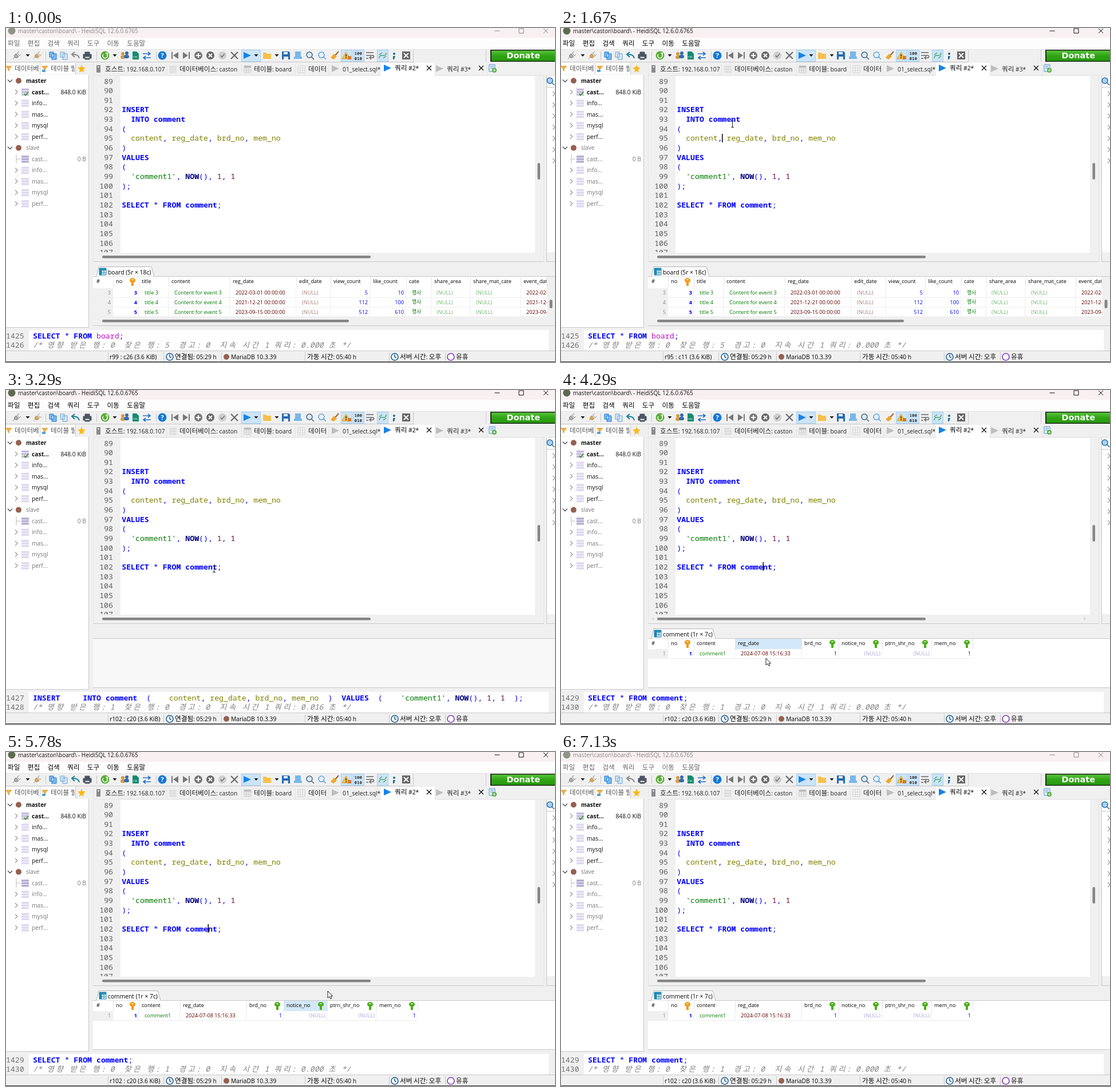
An HTML page with a canvas for the animation above (7220 ms loop, 959 by 584 pixels).

```html
<!DOCTYPE html>
<html lang="ko">
<head>
<meta charset="utf-8">
<style>
html, body { margin: 0; width: 959px; height: 584px; overflow: hidden; background: #f0f0f0; }
canvas { display: block; }
</style>
</head>
<body>
<canvas id="stage" width="959" height="584"></canvas>
<script>
const ctx = document.getElementById('stage').getContext('2d');
const LOOP = 7220, CELL = 7.93;
const UI = '"Open Sans", "Noto Sans", "Noto Sans CJK KR", sans-serif';
const MONO = '"Noto Sans Mono", "Noto Sans CJK KR", monospace';
const FACE = '#f0f0f0', LINE = '#c8c8c8', PALE = '#e4e4e4', BLUE = '#0000ff', SKY = '#1479d7';
const THUMB = '#858585', GREEN = '#007a00', MAROON = '#600000', BROWN = '#95604f';

const rect = (x, y, w, h, c) => { ctx.fillStyle = c; ctx.fillRect(x, y, w, h); };

function pill(x, y, w, h, c) {
  ctx.fillStyle = c;
  ctx.beginPath();
  ctx.roundRect(x, y, w, h, Math.min(w, h) / 2);
  ctx.fill();
}

function disc(x, y, r, c) {
  ctx.fillStyle = c;
  ctx.beginPath();
  ctx.arc(x, y, r, 0, 7);
  ctx.fill();
}

// SVG path centred on x, y
function icon(x, y, d, fill, stroke, width = 1.3) {
  ctx.save();
  ctx.translate(x, y);
  const p = new Path2D(d);
  if (fill) { ctx.fillStyle = fill; ctx.fill(p, 'evenodd'); }
  if (stroke) { ctx.strokeStyle = stroke; ctx.lineWidth = width; ctx.stroke(p); }
  ctx.restore();
}

function clip(x, y, w, h, draw) {
  ctx.save();
  ctx.beginPath();
  ctx.rect(x, y, w, h);
  ctx.clip();
  draw();
  ctx.restore();
}

// Hangul runs are set slightly larger than Latin ones; y is the cap-height centre
function text(s, x, y, color = '#000', { size = 10.3, bold = '', right = false, font = UI } = {}) {
  const runs = s.split(/([가-힣]+)/).filter(Boolean).map(r => {
    const f = `${bold} ${/[가-힣]/.test(r) ? size * 1.13 : size}px ${font}`;
    ctx.font = f;
    return [r, f, ctx.measureText(r).width];
  });
  if (right) x -= runs.reduce((sum, r) => sum + r[2], 0);
  ctx.fillStyle = color;
  for (const [r, f, w] of runs) {
    ctx.font = f;
    ctx.fillText(r, x, y + size * 0.36);
    x += w;
  }
}

function mono(s, x, y, color, style = '500') {
  ctx.font = `${style} 13.2px ${MONO}`;
  ctx.fillStyle = color;
  ctx.fillText(s, x, y + 4.7);
}

const TOKENS = [
  [/^'/, GREEN], [/^NOW$/, '#000080', 'bold'], [/^\d/, '#700040'], [/^board$/, '#c010c0'],
  [/^(INSERT|INTO|comment|VALUES|SELECT|FROM)$/, BLUE, 'bold'], [/^\w/, '#808000'], [/./, BLUE],
];
function sql(s, x, y) {
  for (const m of s.matchAll(/'\w+'|\w+|[^\w\s']/g)) {
    const [, color, style] = TOKENS.find(k => k[0].test(m[0]));
    mono(m[0], x + m.index * CELL, y, color, style);
  }
}

function logNote(s, y) {
  let x = 47;
  for (const ch of s) {
    const wide = /[가-힣]/.test(ch);
    mono(ch, x + (wide ? 1 : 0), y, '#808080', 'italic');
    x += CELL * (wide ? 2 : 1);
  }
}

const CHEVRON = 'M-2 -4L2 0L-2 4', DOWN = 'M-4 -2L0 2L4 -2', CROSS = 'M-4 -4L4 4M4 -4L-4 4';
const PLAY = 'M-6 -6L7 0L-6 6Z', DROP = 'M-3.5 -2H3.5L0 2Z', FUNNEL = 'M-6 -5H6L1 1V5L-2 3V1Z';
const LENS = 'M-6 -1A5 5 0 1 0 4 -1A5 5 0 1 0 -6 -1M3 3L7 7', BOX = 'M-6 -6H6V6H-6Z';
const GRID = BOX + 'M-6 -2H6M-6 2H6M-2 -6V6M2 -6V6';
const KEY = 'M-5 -3A5 4 0 1 1 5 -3A5 4 0 0 1 2 1V7H-2V1A5 4 0 0 1 -5 -3M-1.5 -4.5H1.5V-3H-1.5Z';
const PLUG = 'M-7 6L-4 3Q-6 -1 -1 -3L3 2Q0 6 -4 3M0 -4L4 -7M4 1L7 -2M1 -4L5 1';
const PAGES = 'M-6 -6H1V3H-6ZM-2 -3H6V7H-2Z';

const dbIcon = (x, y, c) => { for (const dy of [-6, -1.5, 3]) rect(x - 6, y + dy, 13, 3.5, c); };
const clock = (x, y) => icon(x, y, 'M-6 0A6 6 0 1 0 6 0A6 6 0 1 0 -6 0M0 -4V0L3 2', '#fff', '#155a92', 1.5);

function titleAndMenu(active) {
  const ink = active ? '#111' : '#888';
  rect(0, 0, 959, 17, '#f9f0f2');
  disc(10, 5, 6.5, active ? '#5d6b4d' : '#8d9584');
  text('master\\caston\\board\\ - HeidiSQL 12.6.0.6765', 21, 5.5, ink, { size: 10 });
  icon(858, 5, 'M-4.5 0H4.5', null, ink, 1);
  icon(900, 5, 'M-4 -4H4V4H-4Z', null, ink, 1);
  icon(943, 5, CROSS, null, ink, 1);
  rect(0, 17, 959, 20, '#fdfdfd');
  ['파일', '편집', '검색', '쿼리', '도구', '이동', '도움말']
    .forEach((s, i) => text(s, 3 + i * 34.7, 27, active ? '#000' : '#666'));
}

function toolbar(active) {
  const y = 48, dark = '#666';
  rect(0, 37, 959, 23, FACE);
  rect(0, 37, 959, 1, PALE);
  rect(0, 59, 711, 1, LINE);
  rect(711, 38, 1, 22, LINE);
  [69, 158, 262].forEach(x => rect(x, 41, 1, 15, LINE));
  [[411, 34], [585, 20], [606, 20], [648, 20]].forEach(([x, w]) => {
    rect(x, 38, w, 21, '#a6cff0');
    rect(x + 1, 39, w - 2, 19, '#cce4f7');
  });
  icon(19, y, PLUG, '#aaa', '#888', 1);
  icon(55, y, PLUG, '#e6a23c', '#999', 1);
  [38, 190, 437, 473].forEach(x => icon(x, y, DROP, '#111'));
  icon(82, y, PAGES, '#7dbcf0', SKY, 1);
  icon(101, y, PAGES, '#d5e9f8', '#6aa0cf', 1);
  icon(121, y, 'M7 5Q6 -2 -4 -2M-1 -6L-6 -2L-1 3', null, active ? '#138094' : '#888', 2);
  icon(142, y, 'M-7 -2H7V5H-7ZM-4 -6H4V-2H-4ZM-4 2H4V7H-4Z', '#4b5562', '#4b5562', 1);
  disc(173, y, 7.5, '#58ad35');
  icon(173, y, 'M3 -2A4 4 0 1 1 -3 -2M1 -4H4V0', null, '#fff', 1.6);
  disc(204, 45, 3, '#d99a3b'); disc(211, 44, 3, '#2f6db5');
  pill(200, 48, 8, 6, '#d99a3b'); pill(206, 47, 9, 6, '#2f6db5');
  icon(226, y, 'M-5 -7H2L6 -3V7H-5Z', '#168a72');
  text('csv', 222, 50, '#fff', { size: 5 });
  icon(246, y, 'M-7 -3H5M2 -6L6 -3L2 0M7 4H-5M-2 1L-6 4L-2 7', null, '#2672c8', 1.6);
  disc(273, y, 7.5, SKY);
  text('?', 270.5, y, '#fff', { size: 11, bold: 'bold' });
  icon(295, y, 'M-6 -6H-4V6H-6ZM6 -6V6L-3 0Z', '#777');
  icon(315, y, 'M6 -6H4V6H6ZM-6 -6V6L3 0Z', '#777');
  disc(336, y, 7, '#777'); icon(336, y, 'M-4 0H4M0 -4V4', null, '#fff', 2);
  disc(357, y, 7, dark); icon(357, y, 'M-3 -3L3 3M3 -3L-3 3', null, '#fff', 2);
  disc(378, y, 7, '#cfcfcf'); icon(378, y, 'M-3 0L-1 3L4 -3', null, '#777', 1.6);
  icon(399, y, 'M-6 -6L6 6M6 -6L-6 6', null, dark, 2);
  icon(421, y, PLAY, '#1683e6');
  icon(456, y, 'M-7 -5H-2L0 -3H7V6H-7Z', '#f6c04a');
  icon(489, y, 'M-7 -7H5L7 -5V7H-7ZM-4 -6V-2H3V-6ZM-4 2V7H4V2Z', '#216bb5');
  icon(510, y, 'M-5 -7H5V2H7V6H-7V2H-5Z', '#78b7ea');
  icon(531, y, LENS, '#d8ecfa', '#44617c', 1.5);
  ctx.setLineDash([2, 1]); icon(552, y, LENS, '#e5f2fb', SKY, 1.4); ctx.setLineDash([]);
  icon(574, y, 'M7 -7L1 0', null, '#9a6230', 2);
  icon(574, y, 'M-1 -3L4 2L-2 7L-7 4Z', '#f0a62b');
  icon(594, y, 'M0 -6L7 6H-7Z', '#f7c14a', '#d99a2b', 1);
  icon(594, y, 'M0 -2V2M0 3V5', null, '#222', 1.5);
  icon(600, 52, 'M-3 -3H3V3H-3Z', '#d8792b');
  text('100', 608.5, 44.5, '#333', { size: 7.5, bold: 'bold', font: MONO });
  text('010', 608.5, 53, '#333', { size: 7.5, bold: 'bold', font: MONO });
  icon(636, y, 'M-7 -5H6M-7 0H4Q8 0 6 4H0M2 1L-1 4L2 7M-7 5H-3', null, dark, 1.4);
  icon(658, y, 'M-6 5Q-6 -1 0 0T6 -5M-6 -1L-1 -5M1 5L6 1', null, '#4fa46a', 1.5);
  disc(678, 45, 2, '#176f91'); icon(678, 51, 'M-2 -2H2L0 4H-2Z', '#176f91');
  icon(699, y, 'M-7 -7H7V7H-7Z', '#666'); icon(699, y, CROSS, null, '#fff', 1.8);

  rect(838, 38, 1, 21, LINE);
  rect(846, 38, 113, 21, '#1c2a18');
  const g = ctx.createLinearGradient(0, 39, 0, 58);
  g.addColorStop(0, '#5cc43e'); g.addColorStop(.5, '#2ea414'); g.addColorStop(1, '#27990f');
  rect(848, 39.5, 111, 18, g);
  text('Donate', 874.5, 48, '#fff', { size: 14.4, bold: 'bold', font: '"DejaVu Sans", sans-serif' });
}

function tabs() {
  rect(0, 60, 959, 24, FACE);
  rect(0, 61, 121, 20, '#fff');
  icon(5, 71, FUNNEL, '#e9b04c');
  clip(0, 60, 57, 24, () => text('데이터베이스', 15, 71, '#555'));
  icon(68, 71, FUNNEL, '#e9b04c'); rect(63, 73, 6, 4, '#52a1df');
  clip(60, 60, 60, 24, () => text('테이블 필터', 78, 71, '#555'));
  rect(59, 61, 1, 20, LINE); rect(121, 61, 1, 20, LINE);
  icon(132, 71, 'M0 -7L2 -2L7 -2L3 2L4 7L0 4L-4 7L-3 2L-7 -2L-2 -2Z', '#fbb713');

  rect(152, 82, 807, 1, PALE);
  [152, 280, 411, 505, 563, 749, 840].forEach(x => rect(x, 63, 1, 19, PALE));
  rect(655, 61, 94, 23, '#fff');
  rect(158, 65, 7, 13, '#8b8b8b'); rect(160, 67, 3, 2, '#ddd');
  dbIcon(291, 72, '#dedede');
  icon(422, 72, GRID, '#eee', '#ccc', 1); rect(416, 66, 12, 3, '#bbb');
  icon(516, 72, GRID, '#fafafa', '#d0d0d0', 1);
  icon(575, 71, PLAY, '#bdbdbd');
  icon(666, 70, PLAY, '#1683e6');
  icon(757, 71, PLAY, '#bdbdbd');
  [['호스트: 192.168.0.107', 173], ['데이터베이스: caston', 303], ['테이블: board', 433], ['데이터', 528],
    ['01_select.sql*', 588], ['쿼리 #3*', 770]].forEach(([s, x]) => text(s, x, 72, '#222'));
  text('쿼리 #2*', 679, 70);
  icon(739, 70, CROSS, null, '#111', 1.4);
  icon(830, 70, CROSS, null, '#111', 1.4);
  icon(849, 70, 'M-5 -6H5V6H-5ZM-3 -3H3M-3 0H3', '#e6f2fb', '#4e92c9', 1);
  disc(853, 74, 4, '#4bab34');
  icon(853, 74, 'M-2.5 0H2.5M0 -2.5V2.5', null, '#fff', 1.2);
}

function tree() {
  rect(0, 82, 145, 441, '#fff');
  rect(144, 82, 1, 442, LINE);
  rect(0, 523, 145, 1, LINE);
  ['master', 'slave'].forEach((host, h) => {
    const top = 92.3 + h * 117.3, ink = h ? '#777' : '#111';
    icon(7, top, DOWN, null, '#333', 1.2);
    disc(22, top, 5, BROWN);
    text(host, 35, top, ink, { bold: h ? '' : 'bold', size: 10 });
    ['cast...', 'info...', 'mas...', 'mysql', 'perf...'].forEach((s, i) => {
      const y = top + 19.5 * (i + 1), first = !i;
      if (first && h) icon(18, y, 'M0 -8V8M0 0H7', null, '#bbb', 1);
      else icon(18, y, CHEVRON, null, '#888', 1.1);
      dbIcon(33, y, first ? (h ? '#b5acd3' : '#c4badf') : '#ded8ef');
      if (first && !h) icon(35, y + 3, 'M-3 0L-1 3L4 -3', null, '#3d9b25', 1.8);
      text(s, 45, y, ink, { bold: first && !h ? 'bold' : '' });
    });
    text(h ? '0 B' : '848.0 KiB', 140, top + 19.5, ink, { right: true });
  });
}

const QUERY = { 92: 'INSERT', 93: '  INTO comment', 94: '(', 95: '  content, reg_date, brd_no, mem_no', 96: ')',
  97: 'VALUES', 98: '(', 99: "  'comment1', NOW(), 1, 1", 100: ');', 102: 'SELECT * FROM comment;' };

function editor(t) {
  rect(152, 84, 772, 309, '#fff');
  rect(152, 84, 48, 309, FACE);
  clip(152, 84, 772, 308, () => {
    for (let n = 89; n <= 107; n++) {
      const y = 92.8 + (n - 89) * 16.65;
      mono(n, 187 - CELL * String(n).length, y, '#606060');
      if (QUERY[n]) sql(QUERY[n], 202.3, y);
    }
  });
  if (t >= 900 && t < 2120) rect(281, 185, 1.5, 15, '#000');
  if ((t >= 2800 && t < 3290) || (t >= 4080 && t < 6050)) rect(352.5, 301, 1.5, 15, '#000');
  pill(928.5, 236, 4.5, 29, THUMB);
  pill(168, 398, 469, 4.5, THUMB);
  if (t > 4140 && t < 4350) {
    icon(160, 400, 'M2 -3V3L-2 0Z', '#d5d5d5');
    icon(915, 400, 'M-2 -3V3L2 0Z', '#d5d5d5');
  }
  rect(152, 408, 788, 1, LINE);
  rect(152, 61, 1, 348, PALE);
  rect(939, 84, 1, 325, PALE);
  rect(944, 84, 15, 308, '#fff');
  rect(944, 84, 1, 325, LINE); rect(944, 408, 15, 1, LINE); rect(944, 103, 15, 1, LINE);
  icon(951, 93, LENS, '#a9d4f5', '#2b6ea8', 1.6);
  for (let i = 0; i < 7; i++) icon(957, 115 + i * 19.5, CHEVRON, null, '#999', 1.1);
}

// column: name, left edge, text x (negative means right aligned), colour, key colour
const ORANGE = '#f39a13', LIME = '#4caf1a', NULL = '(NULL)', FADED = '#a9807b';
const BOARD = [
  ['no', 187, -229, BLUE, ORANGE], ['title', 232, 242, GREEN], ['content', 284, 294, GREEN],
  ['reg_date', 391, 401, MAROON], ['edit_date', 507, 517, FADED], ['view_count', 567, -632, BLUE],
  ['like_count', 636, -695, BLUE], ['cate', 699, 709, GREEN], ['share_area', 743, 752, '#72b872'],
  ['share_mat_cate', 811, 821, '#72b872'], ['event_date', 899, 909, MAROON],
];
const COMMENT = [
  ['no', 187, -229, BLUE, ORANGE], ['content', 232, 242, GREEN], ['reg_date', 304, 314, MAROON],
  ['brd_no', 420, -482, BLUE, LIME], ['notice_no', 485, -558, '#b3a9dc', LIME],
  ['ptrn_shr_no', 561, -644, '#b3a9dc', LIME], ['mem_no', 647, -716, BLUE, LIME],
];
const boardRow = (n, date, views, likes, event) =>
  [n, 'title ' + n, 'Content for event ' + n, date + ' 00:00:00', NULL, views, likes, '행사', NULL, NULL, event];
const BOARD_ROWS = [boardRow('3', '2022-03-01', '5', '10', '2022-02-15'),
  boardRow('4', '2021-12-21', '112', '100', '2021-12-01'),
  boardRow('5', '2023-09-15', '512', '610', '2023-09-01')];
const COMMENT_ROWS = [['1', 'comment1', '2024-07-08 15:16:33', '1', NULL, NULL, '1']];

function grid(title, tabEnd, cols, rows, firstY, right, hot) {
  const small = { size: 9.2 };
  rect(152, 435, 807, 85, '#fff');
  icon(0, 0, `M158 434.5L162 417.5H${tabEnd - 5}L${tabEnd} 434.5`, '#fff', '#b5b5b5', 1);
  icon(169, 426, GRID, '#e6f5fb', '#2683a7', 1);
  rect(163, 420, 12, 3, '#1a87b5'); rect(163, 420, 4, 12, '#1a87b5');
  text(title, 178, 427);
  clip(152, 435, right - 152, 85, () => {
    text('#', 158, 443, '#000', small);
    cols.forEach(([name, x, , , key], c) => {
      const end = cols[c + 1] ? cols[c + 1][1] : right;
      if (name === hot) rect(x, 435, end - x, 18, '#d3e8f8');
      rect(x, 435, 1, 18, PALE);
      text(name, x + 5, 443, '#000', small);
      if (key) icon(end - 11, 444, KEY, key);
    });
    rows.forEach((row, r) => {
      const y = firstY + r * 16.6;
      rect(152, y - 8, 34, 16, FACE);
      rect(152, y + 8, right - 152, 1, '#eee');
      text(row[0], 183, y, '#888', { ...small, right: true });
      cols.forEach(([, x, tx, color], c) => {
        rect(x - 1, y - 8, 1, 16, '#eee');
        text(row[c], Math.abs(tx), y, color,
          { size: row[c] === '행사' ? 7.8 : 9.2, bold: c ? '' : 'bold', right: tx < 0 });
      });
    });
    rect(right - 1, 435, 1, 18, PALE);
  });
}

function results(t) {
  rect(152, 435, 807, 85, '#f8f8f8');
  rect(152, 434, 807, 1, LINE);
  if (t < 1700) {
    grid('board (5r × 18c)', 259, BOARD, BOARD_ROWS, 463, 945);
    rect(945, 435, 14, 85, FACE);
    rect(152, 505, 807, 15, FACE);
    pill(949.5, 475, 5, 15, THUMB);
    pill(168, 510, 431, 4.5, THUMB);
  } else if (t >= 3600) {
    const hot = t > 4200 && t < 4400 ? 'reg_date' : t > 5690 && t < 5990 ? 'notice_no' : '';
    grid('comment (1r × 7c)', 270, COMMENT, COMMENT_ROWS, 461, 720, hot);
  }
  rect(152, 520, 807, 1, LINE);
}

const LOG = [
  [1425, 'SELECT * FROM board;', 0, 5, '0.000'],
  [1427, "INSERT     INTO comment  (    content, reg_date, brd_no, mem_no  )  VALUES  (    'comment1', NOW(), 1, 1  );", 1, 0, '0.016'],
  [1429, 'SELECT * FROM comment;', 0, 1, '0.000'],
];
function logAndStatus(t) {
  const [n, query, hit, found, secs] = LOG[t < 1700 ? 0 : t < 3600 ? 1 : 2];
  rect(40, 528, 908, 36, '#fff');
  mono(n, 0, 538, '#707070');
  mono(n + 1, 0, 554, '#707070');
  sql(query, 47, 538);
  logNote(`/* 영향 받은 행: ${hit}  찾은 행: ${found}  경고: 0  지속 시간 1 쿼리: ${secs} 초 */`, 554);

  rect(0, 564, 959, 1, LINE);
  [178, 275, 376, 522, 669, 767].forEach(x => rect(x, 567, 1, 15, LINE));
  const pos = t < 900 ? 'r99 : c26' : t < 2800 ? 'r95 : c11' : 'r102 : c20';
  text(pos + ' (3.6 KiB)', 181, 575);
  clock(286, 575);
  text('연결됨: 05:29 h', 295, 575);
  disc(385, 575, 5, BROWN);
  text('MariaDB 10.3.39', 393, 575);
  text('가동 시간: 05:40 h', 526, 575);
  clock(679, 575);
  text('서버 시간: 오후', 688, 575);
  icon(777, 575, 'M-6 0A6 6 0 1 0 6 0A6 6 0 1 0 -6 0', '#fff', '#8a3fc0', 1.7);
  text('유휴', 786, 575);
  rect(0, 583, 959, 1, '#3a3a3a');
}

// time, x, y
const PATH = [[70, 855, 523], [400, 640, 330], [790, 296, 200], [900, 284, 193], [1270, 299, 168],
  [2080, 299, 168], [2400, 355, 327], [2560, 355, 327], [2870, 363, 313], [4040, 363, 313], [4290, 358, 469],
  [4760, 503, 500], [4960, 760, 482], [5090, 698, 481], [5250, 698, 481], [5700, 545, 446], [5780, 562, 418],
  [5990, 580, 372], [6250, 681, 223], [6450, 760, 452], [6660, 895, 590]];

function pointer(t) {
  const i = PATH.findIndex(p => p[0] > t);
  if (i < 1) return;
  const [a, b] = [PATH[i - 1], PATH[i]];
  const k = (t - a[0]) / (b[0] - a[0]), e = k * k * (3 - 2 * k);
  const x = Math.round(a[1] + (b[1] - a[1]) * e), y = Math.round(a[2] + (b[2] - a[2]) * e);
  if (y > 84 && y < 392) icon(x + .5, y, 'M-2.5 -5.5H2.5M0 -5.5V5.5M-2.5 5.5H2.5', null, '#222', 1);
  else icon(x, y, 'M0 0V12L3 9.5L5 13.5L7 12.5L5 8.8H8.5Z', '#fff', '#222', 1);
}

function frame() {
  const t = performance.now() % LOOP;
  const active = t >= 900 && t < 7130;
  rect(0, 0, 959, 584, FACE);
  titleAndMenu(active);
  toolbar(active);
  tabs();
  tree();
  editor(t);
  results(t);
  logAndStatus(t);
  pointer(t);
  requestAnimationFrame(frame);
}
frame();
</script>
</body>
</html>
```
